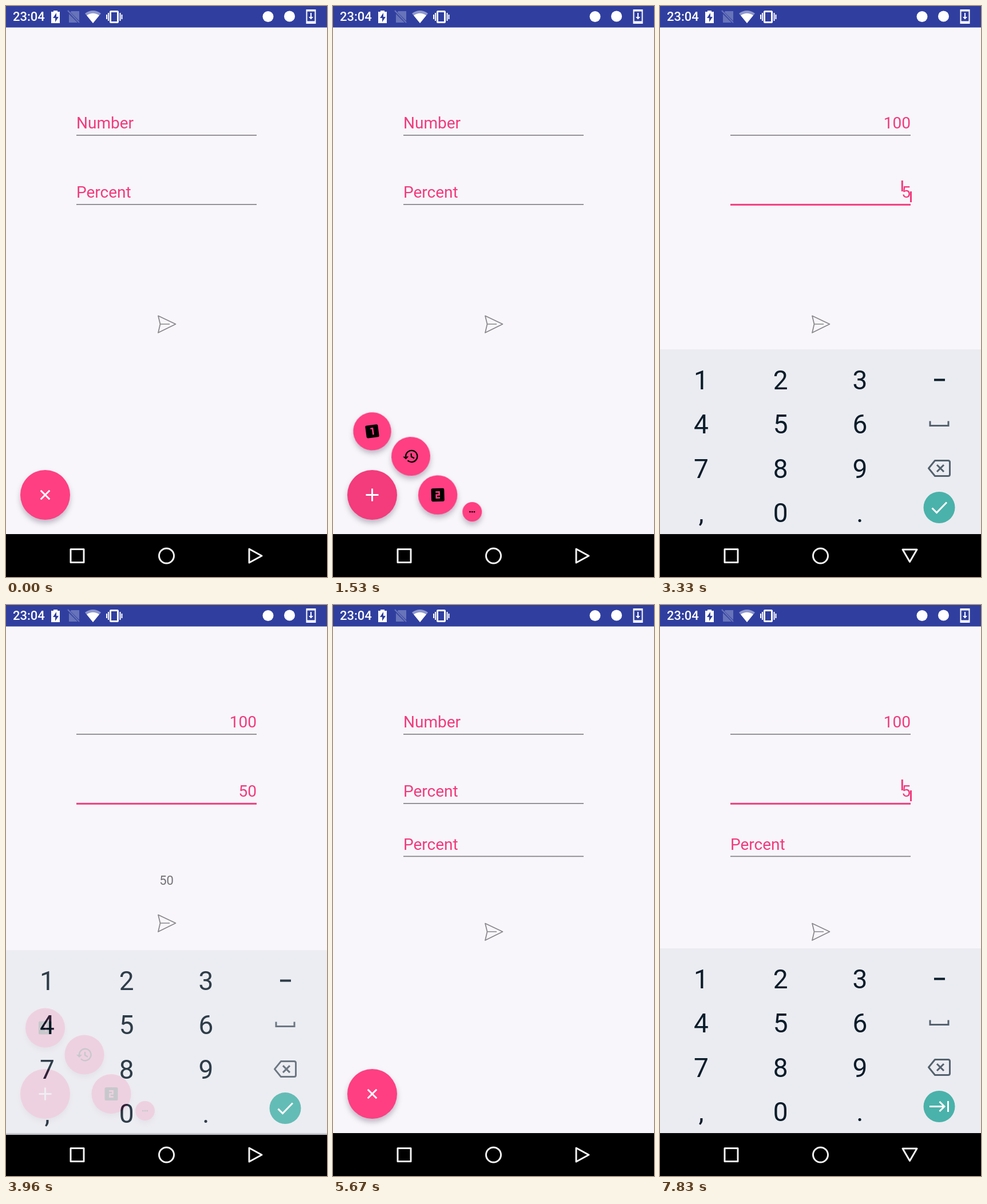
An HTML page for the animation above (8000 ms loop, 561 by 998 pixels).

```html
<!DOCTYPE html>
<html lang="en">
<head>
<meta charset="utf-8">
<title>Percent calculator</title>
<style>
  html, body { margin: 0; width: 100%; height: 100%; overflow: hidden; background: #f8f6fa; }
  svg { display: block; width: 100vw; height: 100vh; font-family: Roboto, sans-serif; }
  .field text { font-size: 28px; fill: #f23a7c; }
  .field .value { text-anchor: end; }
  .line { fill: none; stroke-width: 3; }
  .fab { fill: #ff3f82; filter: drop-shadow(0 6px 5px rgba(40, 20, 60, .27)); }
  .digit { fill: none; stroke: #ff3f82; stroke-width: 2; }
  #keys text { font-size: 46px; fill: #0a1c2a; text-anchor: middle; }
  #keyboard .line { stroke: #53616d; }
  #keyboard .white { stroke: #fff; }
</style>
</head>
<body>
<svg viewBox="0 0 561 998" preserveAspectRatio="none">
  <rect width="561" height="998" fill="#f8f6fa"/>

  <g id="status" fill="#fff">
    <rect width="561" height="37.5" fill="#303f9f"/>
    <text x="12" y="26" font-size="22" font-weight="500">23:04</text>
    <path d="M79 10h4V8h7v2h4v20H79z"/>
    <path d="M88 12l-6 9h4v7l6-9h-4z" fill="#303f9f"/>
    <path d="M114 9h14v20h-18V14z" fill="#6874b9"/>
    <path d="M108 9l20 20" stroke="#303f9f" stroke-width="4"/>
    <path d="M108 8l20 21" stroke="#6874b9" stroke-width="2"/>
    <path d="M152 30L138 13Q152 3 166 13z" fill="#8f98cc"/>
    <path d="M152 30L141 16.500Q152 9 163 16.500z"/>
    <g class="line" stroke="#fff">
      <rect x="182.500" y="9.500" width="13" height="19" rx="1"/>
      <path d="M179 12v14M199.500 12v14M176 15v8M202.500 15v8" stroke-width="2"/>
    </g>
    <circle cx="458" cy="18.500" r="9.500"/>
    <circle cx="495.500" cy="18" r="9.500"/>
    <path d="M524.500 6h17v25h-17zM526.500 9.500v17h13v-17z" fill-rule="evenodd"/>
    <path d="M532 12h2v7h3l-4 4.500-4-4.500h3z"/>
  </g>

  <g id="fields"></g>
  <text id="result" x="280.500" y="489" font-size="22" text-anchor="middle" fill="#737176">50</text>
  <path id="send" fill="none" stroke="#88868b" stroke-width="1.700" stroke-linejoin="round"
        d="M266 541.500L296.500 556 266 571 269.500 556zM269.500 556H286"/>

  <g id="menu">
    <g>
      <circle class="fab" r="34.500"/>
      <g transform="scale(1.280) translate(-12 -12)">
        <rect x="3" y="3" width="18" height="18" rx="2"/><path class="digit" d="M10 8h3v9"/>
      </g>
    </g>
    <g>
      <circle class="fab" r="34.500"/>
      <g transform="scale(1.280) translate(-12 -12)">
        <path d="M5 12a8 8 0 1 1 2.300 5.650M12.750 8v4.600l3.900 2.300" fill="none" stroke="#000" stroke-width="1.900"/>
        <path d="M1 12h8l-4 4z"/>
      </g>
    </g>
    <g>
      <circle class="fab" r="34.500"/>
      <g transform="scale(1.280) translate(-12 -12)">
        <rect x="3" y="3" width="18" height="18" rx="2"/><path class="digit" d="M9 8h5v4h-4v4h5"/>
      </g>
    </g>
    <g>
      <circle class="fab" r="17"/>
      <path d="M-5 0h2.500M-1.250 0h2.500M2.500 0h2.500" stroke="#000" stroke-width="2.300"/>
    </g>
  </g>
  <g transform="translate(68.500 854.500)">
    <circle id="main" class="fab" r="43.500"/>
    <path id="plus" d="M-11 0h22M0-11v22" stroke="#fff" stroke-width="3"/>
  </g>

  <rect y="923" width="561" height="75"/>
  <g class="line" stroke="#f4f4f4" stroke-linejoin="round">
    <rect x="113" y="949.500" width="23" height="23"/>
    <circle cx="280.500" cy="961" r="13"/>
    <path id="back"/>
  </g>

  <g id="keyboard">
    <rect y="600" width="561" height="323" fill="#ebecf1"/>
    <g id="keys"></g>
    <path d="M479 653.500h19" stroke="#0a1c2a" stroke-width="4"/>
    <path class="line" d="M472 725.500v8h32v-8"/>
    <path class="line" stroke-linejoin="round" d="M469.500 808l11-13.500h23q3 0 3 3v21q0 3-3 3h-23zM484 802l12 12M496 802l-12 12"/>
    <circle cx="488" cy="876.500" r="27.500" fill="#4ab2aa"/>
    <path id="next" class="line white" d="M471 876.500h25M488.500 868l8.500 8.500-8.500 8.500M503.500 867v19"/>
    <path id="done" class="line white" d="M475.500 877.500l8 8 17.500-18"/>
  </g>
</svg>

<script>
const LOOP = 8000;
const $ = id => document.getElementById(id);
const clamp = v => Math.min(1, Math.max(0, v));
const show = (node, on) => node.setAttribute('visibility', on ? 'visible' : 'hidden');
const within = (t, [from, to]) => t >= from && t < to;

// Latest entry of a [time, value] track.
const valueAt = (track, t) => track.filter(([start]) => start <= t).pop()[1];

const numberTrack = [[0, ''], [2340, '1'], [2520, '10'], [2700, '100'],
                     [5580, ''], [6660, '1'], [6930, '10'], [7110, '100']];
const percentTrack = [[0, ''], [3240, '5'], [3600, '50'], [5580, ''], [7830, '5']];
const focusTrack = [[0, -1], [1890, 0], [2970, 1], [5580, -1], [6030, 0], [7290, 1]];
const cursorGaps = [[3870, 4000], [4460, 4940], [5440, 5580], [6480, 6660], [7560, 7830]];
const keyboardSpans = [[1900, 3910], [5990, 9000]];
const menuMoves = [
  { start: 500, opens: true, length: 300 },
  { start: 960, opens: false, length: 300 },
  { start: 1394, opens: true, length: 300 },
  { start: 4470, opens: false, length: 300 },
  { start: 5135, opens: true, length: 300 },
  { start: 5580, opens: false, length: 90 }
];
const main = { x: 68.5, y: 854.5 };
const items = [
  { x: 68.5, y: 739, delay: 15 },
  { x: 137, y: 786, delay: 7 },
  { x: 184, y: 854.5, delay: 4 },
  { x: 243, y: 884, delay: 0 }
].map((item, i) => ({ ...item, node: $('menu').children[i] }));

function makeField(label, baseline, track) {
  const group = document.createElementNS('http://www.w3.org/2000/svg', 'g');
  group.setAttribute('class', 'field');
  group.innerHTML = `<text x="123" y="${baseline}">${label}</text>
    <text class="value" x="438" y="${baseline}"></text><rect x="123" width="315"/>
    <path stroke="#f23a7c" stroke-width="3"/>`;
  $('fields').append(group);
  const [hint, value, line, cursor] = group.children;
  return { group, hint, value, line, cursor, baseline, track };
}
const fields = [
  makeField('Number', 214, numberTrack),
  makeField('Percent', 335, percentTrack),
  makeField('Percent', 427.5, [[0, '']])
];

['123', '456', '789', ',0.'].forEach((row, r) => [...row].forEach((key, c) => {
  $('keys').insertAdjacentHTML('beforeend',
    `<text x="${72 + c * 138.7}" y="${670 + r * 77.4}">${key}</text>`);
}));

function overshoot(k, tension = 1.2) {
  const u = k - 1;
  return u * u * ((tension + 1) * u + tension) + 1;
}

function menuProgress(t, delay = 0) {
  const move = menuMoves.filter(m => m.start <= t).pop();
  if (!move) return 0;
  const k = clamp((t - move.start - (move.opens ? delay : 0)) / move.length);
  return move.opens ? overshoot(k) : 1 - k * k;
}

function drawField(field, t, focused) {
  const { hint, value, line, cursor, baseline, track } = field;
  const text = valueAt(track, t);
  show(hint, !text);
  value.textContent = text;
  line.setAttribute('y', baseline + (focused ? 10.8 : 11));
  line.setAttribute('height', focused ? 3 : 1.7);
  line.setAttribute('fill', focused ? '#f23a7c' : '#858288');
  show(cursor, focused && !cursorGaps.some(gap => within(t, gap)));
  const left = text ? 439 - text.length * 15.72 : 123.5;
  const right = text ? 438.5 : 123.5;
  cursor.setAttribute('d', `M${left} ${baseline - 30}v19M${right} ${baseline - 11}v19`);
}

function drawMenu(t) {
  for (const { x, y, delay, node } of items) {
    const p = menuProgress(t, delay);
    const px = main.x + (x - main.x) * p;
    const py = main.y + (y - main.y) * p;
    show(node, p > 0.01);
    node.setAttribute('transform',
      `translate(${px} ${py}) rotate(${(p - 1) * 200}) scale(${Math.min(1, p)})`);
  }
  $('plus').setAttribute('transform', `rotate(${45 * (1 - menuProgress(t))})`);
  const pressed = menuMoves.some(m => within(t, [m.start, m.start + m.length / 2]));
  $('main').style.fill = pressed ? '#f43b7b' : '';
}

function drawKeyboard(t) {
  const span = keyboardSpans.find(([from, to]) => within(t, [from, to + 130]));
  show($('keyboard'), span);
  show($('next'), span && !within(t, [2970, 4100]));
  show($('done'), span && within(t, [2970, 4100]));
  const up = keyboardSpans.some(s => within(t, s));
  $('back').setAttribute('d', up ? 'M424 950h25l-12.500 21.500z' : 'M425 949v24l22-12z');
  if (!span) return;
  const entering = 1 - clamp((t - span[0]) / 200);
  const leaving = clamp((t - span[1]) / 130);
  const away = Math.max(entering, leaving) ** 2;
  $('keyboard').setAttribute('opacity', 1 - away);
  $('keyboard').setAttribute('transform', `translate(0 ${20 * away})`);
}

function draw(t) {
  const twoPercents = t >= 5580;
  const focus = valueAt(focusTrack, t);
  fields.forEach((field, i) => drawField(field, t, i === focus));
  fields[2].group.style.display = twoPercents ? '' : 'none';
  $('send').setAttribute('transform', `translate(0 ${twoPercents ? 15 : 0})`);
  show($('result'), within(t, [3870, 5580]));
  drawMenu(t);
  drawKeyboard(t);
}

const begin = performance.now();
function tick() {
  draw((performance.now() - begin) % LOOP);
  requestAnimationFrame(tick);
}
tick();
</script>
</body>
</html>
```
